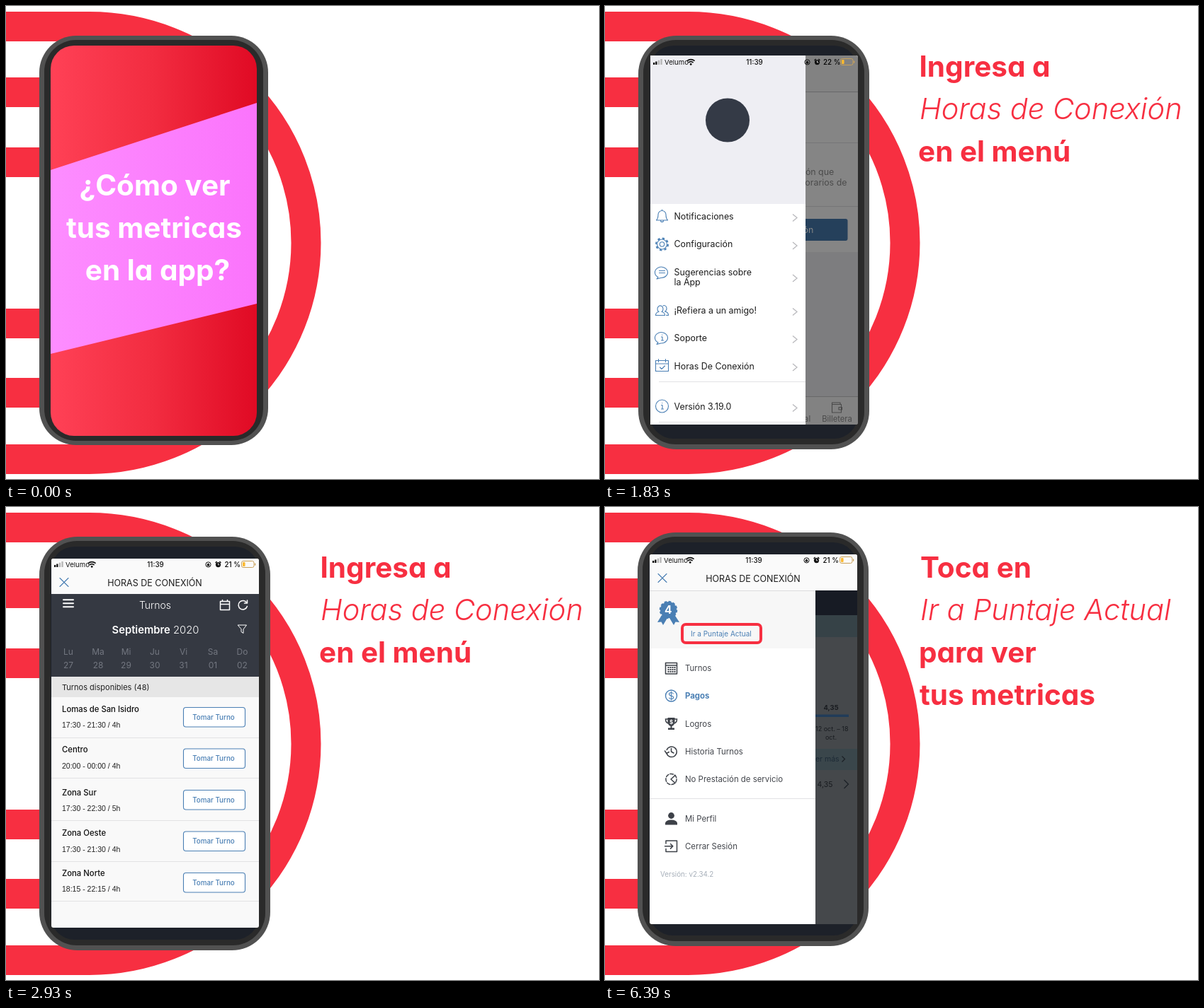
An HTML page for the animation above (8 s loop, 837 by 669 pixels).

```html
<!DOCTYPE html>
<html lang="es">
<head>
<meta charset="utf-8">
<title>Métricas en la app</title>
<style>
html, body { margin: 0; width: 100%; height: 100%; overflow: hidden; background: #fff; }
svg { display: block; width: 100vw; height: 100vh; font-family: Inter, "Open Sans", sans-serif; font-size: 12.4px; }
.mid { text-anchor: middle; }
.head { font-size: 40.5px; font-weight: 700; fill: #f72f41; font-feature-settings: "cv11"; }
.head .it { font-size: 41.5px; font-weight: 300; font-style: italic; }
.ln { fill: none; stroke: #4a7fb4; stroke-width: 1.1; stroke-linecap: round; stroke-linejoin: round; }
.dk { stroke: #3d4148; stroke-width: 1.5; }
.gr { stroke: #8b8b8b; }
.wh { stroke: #fff; }
.chev { fill: none; stroke: #b9b9bd; stroke-width: 1.3; }
.rule { stroke: #e2e2e4; }
.mark { fill: none; stroke: #f72f41; stroke-width: 4; }
.blue { fill: #4a7fb4; }

/* hard cuts */
.cut { opacity: 0; animation: 8s step-end infinite; }
.intro { animation-name: intro; }
.phone { animation-name: phone; }
.state { animation-name: state; }
.mark1 { animation-name: mark1; }
.menu { animation-name: menu; }
.mark2 { animation-name: mark2; }
.shifts { animation-name: shifts; }
.mark3 { animation-name: mark3; }
.head1 { animation-name: head1; }
.head2 { animation-name: head2; }
.last { animation-name: last; }
.mark4 { animation-name: mark4; }
@keyframes intro { 0% { opacity: 1 } 6.25%, 100% { opacity: 0 } }
@keyframes phone { 0% { opacity: 0 } 6.25% { opacity: 1 } 73.25%, 100% { opacity: 0 } }
@keyframes state { 0% { opacity: 0 } 6.25% { opacity: 1 } 22.875%, 100% { opacity: 0 } }
@keyframes mark1 { 0% { opacity: 0 } 8.75% { opacity: 1 } 22.875%, 100% { opacity: 0 } }
@keyframes menu { 0% { opacity: 0 } 22.875% { opacity: 1 } 36.625%, 100% { opacity: 0 } }
@keyframes mark2 { 0% { opacity: 0 } 25% { opacity: 1 } 36.25%, 100% { opacity: 0 } }
@keyframes shifts { 0% { opacity: 0 } 36.625% { opacity: 1 } 73.25%, 100% { opacity: 0 } }
@keyframes mark3 { 0% { opacity: 0 } 46.625% { opacity: 1 } 73.25%, 100% { opacity: 0 } }
@keyframes head1 { 0% { opacity: 0 } 6.25% { opacity: 1 } 41.625%, 100% { opacity: 0 } }
@keyframes head2 { 0% { opacity: 0 } 41.625% { opacity: 1 } 73.25%, 100% { opacity: 0 } }
@keyframes last { 0% { opacity: 0 } 73.25%, 100% { opacity: 1 } }
@keyframes mark4 { 0% { opacity: 0 } 79.875%, 100% { opacity: 1 } }
</style>
</head>
<body>
<svg viewBox="0 0 837 669" preserveAspectRatio="none">
<defs>
  <linearGradient id="red"><stop stop-color="#ff4156"/><stop offset=".5" stop-color="#f22c40"/><stop offset="1" stop-color="#e00a24"/></linearGradient>
  <linearGradient id="pink"><stop stop-color="#fd8dff"/><stop offset="1" stop-color="#fb74fc"/></linearGradient>
  <clipPath id="glass"><rect x="63" y="56" width="291" height="552" rx="33"/></clipPath>
  <clipPath id="view"><rect x="64" y="73" width="293" height="522" rx="3"/></clipPath>
  <path id="chev" class="chev" d="M-3 -5L3 0L-3 5"/>

  <g id="body">
    <rect x="47" y="42" width="326" height="585" rx="54" fill="#515151"/>
    <rect x="54" y="48" width="312" height="572" rx="46" fill="#2a2a2a"/>
    <rect x="63" y="56" width="294" height="556" rx="34" fill="#1d2129"/>
  </g>

  <g id="status" font-size="9.8" font-weight="500" fill="#111">
    <path d="M68 86v-3h2.3v3zM71.2 86v-4.6h2.3v4.6z"/>
    <path d="M74.8 86v-6.2h2.3v6.2zM78.4 86v-8h2.3v8z" fill="#b5b5b5"/>
    <text x="84" y="86" font-weight="400" font-size="9.6">Velumo</text>
    <g fill="none" stroke="#111" stroke-width="1.7"><path d="M115.8 80.6q5.4-4 10.8 0M117.8 83q3.4-2.6 6.8 0"/></g>
    <circle cx="121.2" cy="85.4" r="1.4"/>
    <text x="211" y="86" class="mid">11:39</text>
    <circle cx="285.5" cy="82.4" r="3.6" fill="none" stroke="#111"/>
    <path d="M283.8 82h3.4v2.4h-3.4zM284.4 82v-1.3h2.2v1.3z"/>
    <circle cx="299.5" cy="82.6" r="3.6"/>
    <path d="M295.6 80l2-2M303.4 80l-2-2" stroke="#111" stroke-width="1.4"/>
    <path d="M299.5 80.4v2.4h1.8" fill="none" stroke="#fff" stroke-width=".8"/>
    <rect x="332.5" y="77.5" width="17.5" height="9" rx="2.4" fill="none" stroke="#c9a15a"/>
    <rect x="334" y="79" width="3.6" height="6" rx="1" fill="#fcb92f"/>
    <path d="M351.6 80.6v3" stroke="#c9a15a" stroke-width="1.3"/>
  </g>

  <g id="home">
    <g clip-path="url(#view)">
      <rect x="64" y="73" width="293" height="278" fill="#fff"/>
      <rect x="64" y="73" width="293" height="51" fill="#f8f8f8"/>
      <rect x="64" y="351" width="293" height="205" fill="#eeeef3"/>
      <rect x="64" y="556" width="293" height="39" fill="#f8f8f8"/>
      <path d="M64 124.5H357M64 555.5H357" stroke="#c6c6c8"/>
      <path class="rule" d="M64 196.5H357M64 286.5H357"/>
    </g>
    <path class="ln" d="M76.5 101.5h14M76.5 106.8h14M76.5 112h14"/>
    <g class="mid" fill="#1c1c1c">
      <text x="210" y="112" font-size="12">ESTADO</text>
      <text x="210" y="146" font-size="12.2" fill="#333">Estado actual:</text>
      <text x="210" y="178" font-size="25" font-weight="200" fill="#777">Inactivo</text>
    </g>
    <text x="78.5" y="222" font-size="13.7" font-weight="500" fill="#1c1c1c">¿Querés repartir ahora?</text>
    <g fill="#8e8e8e">
      <text x="78.5" y="241.5">No tienes ningún horario de conexión que</text>
      <text x="78.5" y="257">comience pronto. Busca por más horarios de</text>
      <text x="78.5" y="272">conexión disponibles.</text>
    </g>
    <rect x="78.5" y="304" width="264" height="31" rx="3" fill="#467aae"/>
    <text x="210.5" y="324" class="mid" fill="#fff">Buscar horarios de conexión</text>
    <g class="mid" font-size="11.2" fill="#8b8b8b">
      <text x="92.5" y="591" class="blue" font-weight="500">Estado</text>
      <text x="151" y="591">Pedidos</text>
      <text x="210" y="591">Mapa</text>
      <text x="268.5" y="591">Historial</text>
      <text x="327.5" y="591">Billetera</text>
    </g>
    <path class="ln" d="M85 571l5.5 6L101 566"/>
    <g class="ln gr">
      <path d="M148 565h12.5M148 571.3h12.5M148 577.5h12.5"/>
      <circle cx="143.8" cy="565" r="1.6"/><circle cx="143.8" cy="571.3" r="1.6"/><circle cx="143.8" cy="577.5" r="1.6"/>
      <path d="M202.5 564.5l4.5-1.5v14l-4.5 1.5zM207 563l5 1.5v14l-5-1.5M212 564.5l5-1.5v14l-5 1.5M205 565v12M214.5 565v12" stroke-width="1.5"/>
      <circle cx="268.5" cy="570.7" r="8.6"/><path d="M268.5 564.5v6.5h5"/>
      <path d="M320.5 566.5h13v11.5h-13zM320.5 566.5v-2.5h11.5v2.5M330 570.5h4.500v3.500h-4.500z"/>
    </g>
  </g>

  <!-- frame, status bar and title shared by the last two screens -->
  <g id="top">
    <rect x="64" y="73" width="293" height="51" rx="3" fill="#fafafa"/>
    <use href="#status" y="-1"/>
    <text x="308.500" y="85" font-size="9.8" font-weight="500">21 %</text>
    <path class="ln" stroke-width="1.3" d="M76 100.500l12 12M88 100.500l-12 12"/>
    <text x="210" y="111.500" class="mid" font-size="12.5" fill="#1c1c1c">HORAS DE CONEXIÓN</text>
  </g>
</defs>

<g fill="none" stroke="#f72f41" stroke-width="42">
  <path d="M0 29H117.500A306 306 0 0 1 117.500 641H0"/>
  <path d="M0 122H60M0 221H60M0 449H60M0 547H60"/>
</g>

<g class="cut intro">
  <rect x="47" y="42" width="323" height="579" rx="52" fill="#515151"/>
  <rect x="54" y="48" width="309" height="567" rx="45" fill="#2a2a2a"/>
  <g clip-path="url(#glass)">
    <rect x="63" y="56" width="291" height="552" fill="url(#red)"/>
    <path d="M63 232L354 137V421L63 492z" fill="url(#pink)"/>
  </g>
  <g class="head mid" style="fill:#fff">
    <text x="210" y="267.500">¿Cómo ver</text>
    <text x="209" y="328">tus metricas</text>
    <text x="214" y="388">en la app?</text>
  </g>
</g>

<use href="#body" class="cut phone"/>

<g class="cut state">
  <use href="#home"/>
  <use href="#status"/>
  <text x="308" y="86" font-size="9.8" font-weight="500">22 %</text>
</g>
<rect class="cut mark mark1" x="69" y="93" width="29" height="27" rx="5"/>

<g class="cut menu">
  <use href="#home" y="-3"/>
  <rect x="64" y="70" width="293" height="522" rx="3" fill="#000" opacity=".48"/>
  <rect x="64" y="70" width="219" height="522" fill="#fff"/>
  <rect x="64" y="70" width="219" height="210" fill="#eeeef3"/>
  <use href="#status" y="-3"/>
  <text x="308" y="83" font-size="9.8" font-weight="500">22 %</text>
  <circle cx="173" cy="161.500" r="31" fill="#343a46"/>
  <g fill="#1c1c1c">
    <text x="97.500" y="301.500">Notificaciones</text>
    <text x="97.500" y="341">Configuración</text>
    <text x="97.500" y="381">Sugerencias sobre</text>
    <text x="97.500" y="395">la App</text>
    <text x="97.500" y="434.500">¡Refiera a un amigo!</text>
    <text x="97.500" y="474">Soporte</text>
    <text x="97.500" y="513.500">Horas De Conexión</text>
    <text x="97.500" y="570.500">Versión 3.19.0</text>
  </g>
  <use href="#chev" x="268" y="299.500"/><use href="#chev" x="268" y="339"/>
  <use href="#chev" x="268" y="385"/><use href="#chev" x="268" y="432.500"/>
  <use href="#chev" x="268" y="471.500"/><use href="#chev" x="268" y="511"/>
  <use href="#chev" x="268" y="568.500"/>
  <path class="rule" d="M76 531.500H283M76 588.500H283"/>
  <g class="ln">
    <path d="M72.500 303q2.500-2.500 2.500-8a5.500 5.500 0 0 1 11 0q0 5.500 2.500 8zM78.500 303.500a2 2 0 0 0 4 0M80.500 289.500v-1.500"/>
    <circle cx="80.500" cy="337" r="3.200"/>
    <circle cx="80.500" cy="337" r="7"/>
    <circle cx="80.500" cy="337" r="8.400" stroke-width="2.200" stroke-linecap="butt" stroke-dasharray="3.300 3.300"/>
    <path d="M75 383.500a9 7.700 0 1 1 4 1l-6 1.500zM76.500 374.500h8M76.500 377.500h8"/>
    <path d="M71.500 437.500q0-4 4.500-5a4 4.600 0 1 1 4 0q4.500 1 4.500 5zM82 424a3.500 4.300 0 1 1 2.500 8q5 1 5 5.500h-3"/>
    <path d="M75 476a9 7.700 0 1 1 4 1l-6 1.500zM79.500 468h1.500v5M79.500 473h3M80.700 465v.2"/>
    <path d="M71.500 501.500h18v15h-18zM71.500 506h18M75.500 499.500v4M85.500 499.500v4M77.500 511l2.500 2.500 4.500-4.500"/>
    <circle cx="80.500" cy="566" r="9"/><path d="M79.500 564.500h1.500v5.500M79.500 570h3M80.700 561.500v.2"/>
  </g>
</g>
<rect class="cut mark mark2" x="66" y="490" width="213" height="38" rx="6"/>

<g class="cut shifts">
  <rect x="64" y="73" width="293" height="522" rx="3" fill="#f9f9f9"/>
  <use href="#top"/>
  <rect x="64" y="123" width="293" height="117" fill="#353942"/>
  <path class="ln wh" style="stroke-width:2" d="M81 131.300h14M81 136.300h14M81 141.300h14"/>
  <g class="ln wh" style="stroke-width:1.500">
    <path d="M302.500 133.500h13v12h-13zM302.500 137.500h13M305.500 131.500v2M312.500 131.500v2"/>
    <path d="M339.800 135.500a6.300 6.300 0 1 0 .6 5M340.500 132v4h-4"/>
    <path d="M327.500 167h12l-4.500 6v5.500l-3-2v-3.500z" style="stroke-width:1"/>
  </g>
  <g class="mid" fill="#fff">
    <text x="210.500" y="144" font-size="14" font-weight="300">Turnos</text>
    <text x="211" y="178.500" font-size="14.800"><tspan font-weight="600">Septiembre</tspan><tspan font-weight="300"> 2020</tspan></text>
  </g>
  <g id="days" class="mid" font-size="12" fill="#737780"></g>
  <rect x="64" y="240" width="293" height="29" fill="#e6e6e6"/>
  <text x="79" y="259" font-size="11" fill="#222">Turnos disponibles (48)</text>
  <g id="rows"></g>
</g>
<rect class="cut mark mark3" x="73" y="122" width="31" height="27" rx="5"/>

<g class="cut head head1">
  <text x="443.500" y="100">Ingresa a</text>
  <text x="444" y="160" class="it">Horas de Conexión</text>
  <text x="442" y="220">en el menú</text>
</g>
<g class="cut head head2">
  <text x="443.500" y="100">En el menú de</text>
  <text x="444" y="160" class="it">Horas de Conexión</text>
  <text x="442" y="220">podrás</text>
  <text x="443" y="280">ver tu ranking</text>
</g>

<g class="cut last">
  <g transform="translate(-1 -6)"><use href="#body"/>
    <rect x="64" y="73" width="293" height="523" rx="3" fill="#fff"/>
    <use href="#top"/>
  </g>
  <rect x="297" y="118" width="59" height="472" fill="#45484b"/>
  <rect x="297" y="118" width="59" height="35" fill="#171b24"/>
  <rect x="297" y="153" width="59" height="31" fill="#364247"/>
  <rect x="297" y="342" width="59" height="30" fill="#3a464b"/>
  <rect x="297" y="293.500" width="47" height="3.500" fill="#213c59"/>
  <g font-size="9.500" fill="#191c20">
    <text x="319" y="287" class="mid" font-weight="700">4,35</text>
    <text x="297" y="317" font-size="9">12 oct. – 18</text>
    <text x="319" y="329" class="mid" font-size="9">oct.</text>
    <text x="297" y="360" font-size="10.500" fill="#1d2a36">er más</text>
    <text x="299.500" y="395.500" font-size="10.500">4,35</text>
  </g>
  <g fill="none" stroke="#1b2026" stroke-width="1.200"><path d="M334.500 352.500l4 4-4 4M337.500 386l6 6-6 6"/></g>
  <rect x="63" y="118" width="234" height="82" fill="#f7f7f7"/>
  <path d="M63 118.500H297" stroke="#dcdcde"/>
  <path class="rule" d="M63 412.500H297"/>
  <g class="blue">
    <path d="M80 153l-6 10 5.500-.5 2.500 4.500 6-10zM98.500 153l6.500 10-5.500-.5-2.500 4.500-6-10z"/>
    <circle cx="89.500" cy="145.500" r="11.500"/>
    <circle cx="89.500" cy="145.500" r="11.500" fill="none" stroke="#4a7fb4" stroke-width="2.500" stroke-dasharray="3.600 2.400"/>
    <text x="89.300" y="151" class="mid" font-size="15.500" font-weight="700" fill="#fff" style="fill:#fff">4</text>
    <text x="121" y="182.500" font-size="10">Ir a Puntaje Actual</text>
  </g>
  <g font-size="11.400" fill="#43464c">
    <text x="113" y="231.800">Turnos</text>
    <text x="113" y="270.500" class="blue" font-weight="700">Pagos</text>
    <text x="113" y="310.500">Logros</text>
    <text x="113" y="349.800">Historia Turnos</text>
    <text x="113" y="389">No Prestación de servicio</text>
    <text x="113" y="445">Mi Perfil</text>
    <text x="113" y="484">Cerrar Sesión</text>
    <text x="78" y="523" font-size="9.800" fill="#a6afb9">Versión: v2.34.2</text>
  </g>
  <g class="ln dk">
    <path d="M85.500 220.500h16v15.500h-16zM85.500 224h16"/>
    <path d="M88.500 227h11M88.500 230h11M88.500 233h11" stroke-width="2" stroke-linecap="butt" stroke-dasharray="2 1"/>
    <path d="M87 348.500a7.300 7.300 0 1 0 .2-5M84.500 345l2.300 3.500 3.500-2M93.500 341.500v4.500l3.500 2"/>
    <circle cx="93.500" cy="385" r="7.600" stroke-dasharray="4.500 2.300"/>
    <path d="M99 379.500l-6 5.500 6 5.500"/>
    <path d="M86 476v-4h15.500v15.500H86v-4M84.500 479.800h11M92.500 476.500l3.300 3.300-3.300 3.300"/>
  </g>
  <g class="ln">
    <circle cx="93.500" cy="267" r="8" stroke-width="1.400"/>
    <path d="M96.300 264q-1-1.500-3-1.500-2.800 0-2.800 2.200 0 1.800 3 2.300 3 .5 3 2.400 0 2.100-3 2.100-2 0-3-1.500M93.500 261v12"/>
  </g>
  <g fill="#3d4148">
    <path d="M88.500 298h10v6q-.5 5-4 6v2.500h3.500v2.500h-9v-2.500h3.500v-2.500q-3.500-1-4-6z"/>
    <path d="M89 300h-3.500q0 5 4 6M98 300h3.500q0 5-4 6" fill="none" stroke="#3d4148" stroke-width="1.500"/>
    <text x="93.500" y="307" class="mid" font-size="8" font-weight="700" fill="#fff">$</text>
    <circle cx="93.500" cy="436.500" r="4.400"/>
    <path d="M85 449.500v-2.500q1-4.500 8.500-4.500t8.500 4.500v2.500z"/>
  </g>
  <g class="head">
    <text x="445" y="100">Toca en</text>
    <text x="445" y="160" class="it">Ir a Puntaje Actual</text>
    <text x="443" y="220">para ver</text>
    <text x="444" y="280">tus metricas</text>
  </g>
</g>
<rect class="cut mark mark4" x="109" y="166" width="111" height="26" rx="5"/>
</svg>
<script>
const days = [["Lu", 27, 88], ["Ma", 28, 130], ["Mi", 29, 169.5], ["Ju", 30, 210], ["Vi", 31, 250.5], ["Sa", "01", 292], ["Do", "02", 333.5]];
document.getElementById("days").innerHTML = days.map(([name, num, x]) =>
  `<text x="${x}" y="209">${name}</text><text x="${x}" y="227.5">${num}</text>`).join("");

// name, hours, title baseline, bottom rule
const shifts = [
  ["Lomas de San Isidro", "17:30 - 21:30 / 4h", 289.5, 326.5],
  ["Centro", "20:00 - 00:00 / 4h", 347, 383.5],
  ["Zona Sur", "17:30 - 22:30 / 5h", 407.5, 443.5],
  ["Zona Oeste", "17:30 - 21:30 / 4h", 465, 501.5],
  ["Zona Norte", "18:15 - 22:15 / 4h", 521.5, 557.5]
];
document.getElementById("rows").innerHTML = shifts.map(([name, hours, y, rule], i) => {
  const top = 283.5 + i * 58.5;
  return `<path class="rule" d="M64 ${rule}H357"/>
    <text x="79" y="${y}" font-size="11.3" font-weight="500" fill="#111">${name}</text>
    <text x="79" y="${y + 22.5}" font-size="10.5" font-family="Liberation Sans, sans-serif" fill="#222">${hours}</text>
    <rect class="ln" x="250.5" y="${top}" width="87" height="27.5" rx="3.5" style="fill:#fff"/>
    <text x="293" y="${top + 17}" class="mid blue" font-size="9.8" font-weight="500">Tomar Turno</text>`;
}).join("");
</script>
</body>
</html>
```
